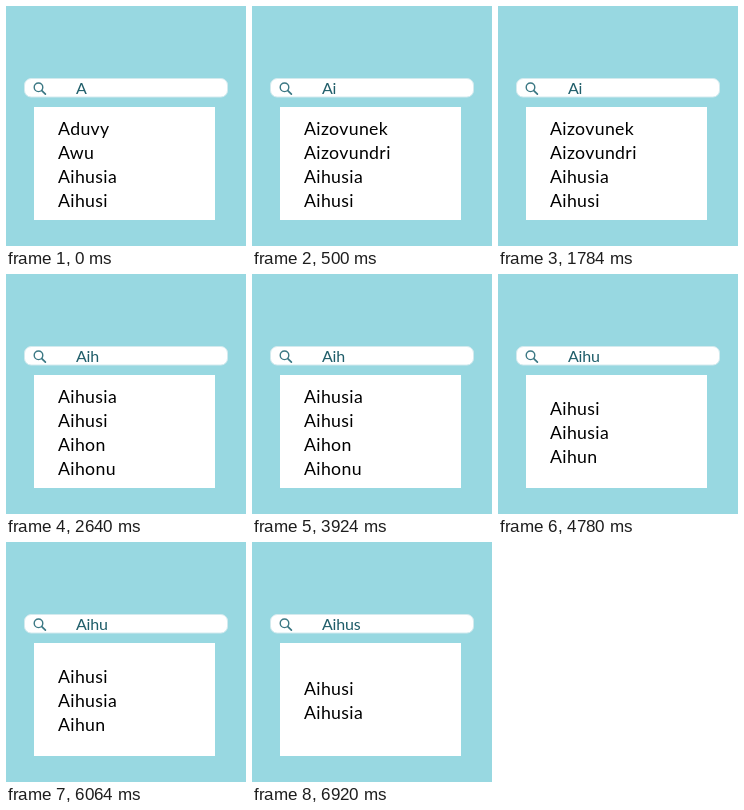
These frames come from a looping animation (240 by 240 pixels, 8000 ms). An HTML page with a canvas:

```html
<!DOCTYPE html>
<html lang="en">
<head>
<meta charset="utf-8">
<title>Search suggestions</title>
<style>
  html, body { margin: 0; width: 100%; height: 100%; overflow: hidden; background: #98d8e1; }
  canvas { display: block; width: 240px; height: 240px; }
</style>
</head>
<body>
<canvas id="stage" width="240" height="240"></canvas>
<script>
const ctx = document.getElementById('stage').getContext('2d');
const LOOP = 8000;
const FONT = 'Lato, "Open Sans", sans-serif';
const QUERY = 'Aihus';
const TEAL = '#1f5d69';

const steps = [
  { at: 0, names: ['Aduvy', 'Awu', 'Aihusia', 'Aihusi'] },
  { at: 500, names: ['Aizovunek', 'Aizovundri', 'Aihusia', 'Aihusi'] },
  { at: 2640, names: ['Aihusia', 'Aihusi', 'Aihon', 'Aihonu'] },
  { at: 4780, names: ['Aihusi', 'Aihusia', 'Aihun'] },
  { at: 6920, names: ['Aihusi', 'Aihusia'] }
];

function label(text, x, y, size, spacing, color) {
  ctx.font = `${size}px ${FONT}`;
  ctx.letterSpacing = `${spacing}px`;
  ctx.fillStyle = color;
  ctx.fillText(text, x, y);
}

function searchBar() {
  ctx.fillStyle = '#fff';
  ctx.strokeStyle = '#d3eaee';
  ctx.lineWidth = 1;
  ctx.beginPath();
  ctx.roundRect(18.5, 72.5, 203, 18.5, 6.5);
  ctx.fill();
  ctx.stroke();
}

function searchIcon() {
  ctx.strokeStyle = '#3a7783';
  ctx.lineCap = 'round';
  ctx.lineWidth = 1.4;
  ctx.beginPath();
  ctx.arc(32.5, 81.3, 4.3, 0, Math.PI * 2);
  ctx.stroke();
  ctx.lineWidth = 1.7;
  ctx.beginPath();
  ctx.moveTo(35.8, 84.6);
  ctx.lineTo(39.4, 88.2);
  ctx.stroke();
}

function draw(index) {
  const { names } = steps[index];
  ctx.fillStyle = '#98d8e1';
  ctx.fillRect(0, 0, 240, 240);

  searchBar();
  searchIcon();
  label(QUERY.slice(0, index + 1), 70, 88, 16, -0.2, TEAL);

  ctx.fillStyle = '#fff';
  ctx.fillRect(28, 101, 181, 113);

  // The list stays vertically centred in the panel.
  const first = 165 - (names.length - 1) * 12;
  names.forEach((name, i) => label(name, 52, first + i * 24, 17.7, 0.35, '#000'));
}

function frame(now) {
  const t = now % LOOP;
  draw(steps.findLastIndex(step => t >= step.at));
  requestAnimationFrame(frame);
}

draw(0);
requestAnimationFrame(frame);
</script>
</body>
</html>
```
